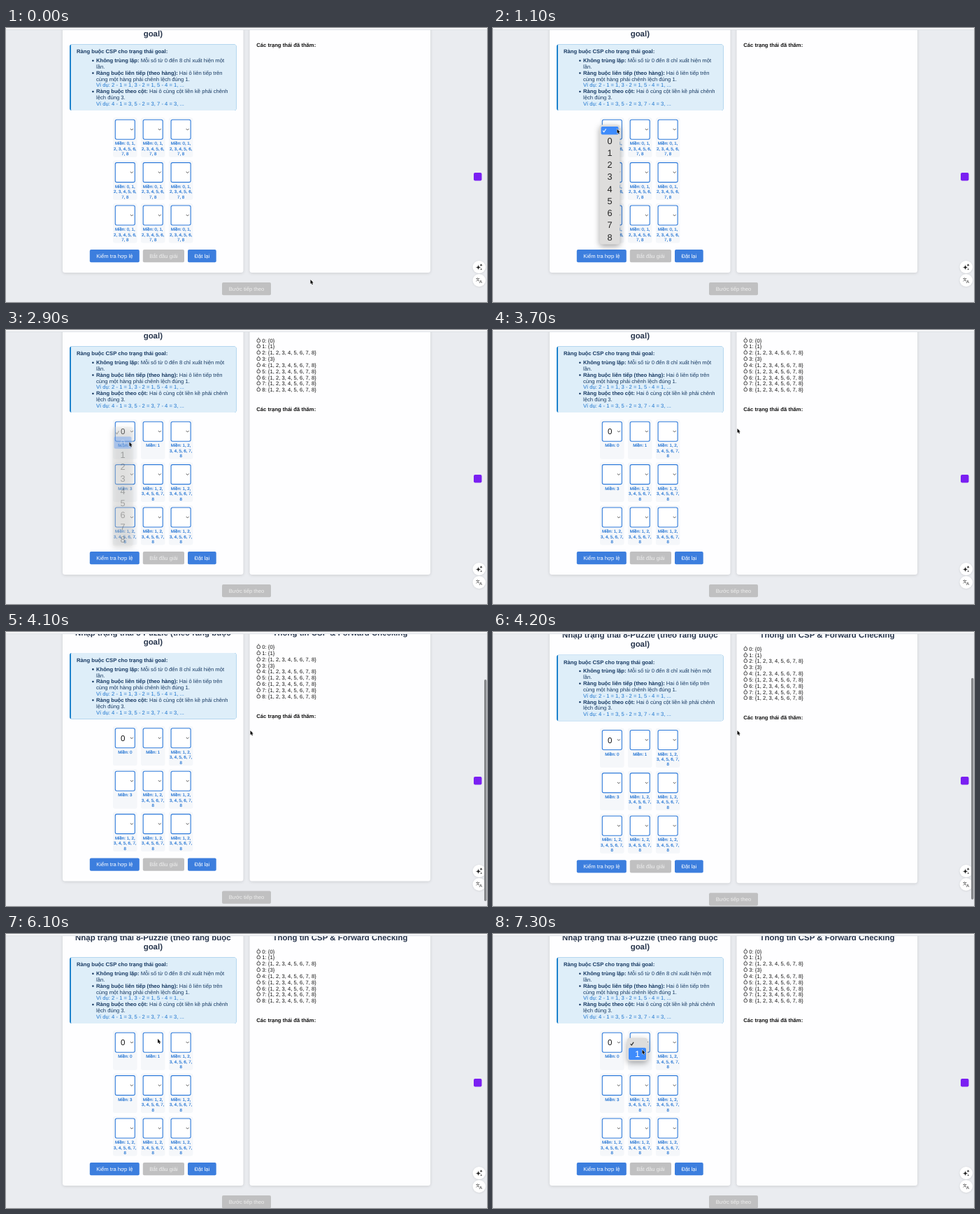
Recreate the animation shown at these times as an HTML page with a canvas. Size 688x392 px, loop 8000 ms.

```html
<!DOCTYPE html>
<html lang="vi">
<head>
<meta charset="utf-8">
<title>8-Puzzle CSP</title>
<style>
  html, body { margin: 0; width: 100%; height: 100%; overflow: hidden; background: #eaecf0; }
  canvas { display: block; width: 688px; height: 392px; }
</style>
</head>
<body>
<canvas id="stage"></canvas>
<script>
const W = 688, H = 392, LOOP = 8000, STEP = 100;
const FONT = '"Liberation Sans", Arial, sans-serif';
const BASE = 7.65, TITLE = 11.45, SMALL = 6.15;
const BLUE = '#2374d3', NAVY = '#183a63', GREY = '#c0c0c1';

const canvas = document.getElementById('stage');
const ctx = canvas.getContext('2d');
const dpr = window.devicePixelRatio || 1;
canvas.width = W * dpr;
canvas.height = H * dpr;

// Pointer tip: time, x, y
const PATH = [
  [0, 435.5, 360], [300, 290, 190], [500, 196, 79], [700, 177.5, 144.5],
  [1100, 177.5, 144.5], [1900, 180, 165], [2200, 168.5, 161],
  [2800, 168.5, 161], [3500, 224, 156], [3700, 349.5, 141],
  [5000, 349.5, 141], [5800, 224, 152], [6100, 217, 150],
  [6600, 217, 150], [7000, 221, 175], [7300, 213.5, 165.5], [LOOP, 213.5, 165.5]
];

const clamp = v => Math.max(0, Math.min(1, v));

function pointerAt(t) {
  const i = PATH.findIndex(p => p[0] > t);
  const [t0, x0, y0] = PATH[i - 1], [t1, x1, y1] = PATH[i];
  const k = (t - t0) / (t1 - t0);
  return [x0 + (x1 - x0) * k, y0 + (y1 - y0) * k];
}

function box(x, y, w, h, r, fill, stroke) {
  ctx.beginPath();
  ctx.roundRect(x, y, w, h, r);
  if (fill) { ctx.fillStyle = fill; ctx.fill(); }
  if (stroke) { ctx.strokeStyle = stroke; ctx.lineWidth = 1.1; ctx.stroke(); }
}

function shadowed(blur, dy, alpha, draw) {
  ctx.save();
  ctx.shadowColor = `rgba(0,0,0,${alpha})`;
  ctx.shadowBlur = blur * dpr;
  ctx.shadowOffsetY = dy * dpr;
  draw();
  ctx.restore();
}

// Draws text centred vertically on y and returns its width
function text(str, x, y, { size = BASE, color = '#111', bold = false, align = 'left' } = {}) {
  ctx.font = `${bold ? 'bold ' : ''}${size}px ${FONT}`;
  ctx.textAlign = align;
  ctx.fillStyle = color;
  ctx.fillText(str, x, y + size * 0.36);
  return ctx.measureText(str).width;
}

function line(points, color, width) {
  ctx.beginPath();
  points.forEach(([x, y]) => ctx.lineTo(x, y));
  ctx.strokeStyle = color;
  ctx.lineWidth = width;
  ctx.lineCap = ctx.lineJoin = 'round';
  ctx.stroke();
}

function panel(x) {
  shadowed(4, 1, 0.13, () => box(x, -30, 258.5, 380, 3.5, '#fefeff'));
}

function rules() {
  box(91, 23.5, 238.5, 94.5, 3, '#1d82cc');
  box(93, 23.5, 236.5, 94.5, [1, 3, 3, 1], '#deeef9');
  text('Ràng buộc CSP cho trạng thái goal:', 101, 33.5, { color: NAVY, bold: true });
  const rows = [
    ['Không trùng lặp:', ' Mỗi số từ 0 đến 8 chỉ xuất hiện một'],
    ['', 'lần.'],
    ['Ràng buộc liên tiếp (theo hàng):', ' Hai ô liên tiếp trên'],
    ['', 'cùng một hàng phải chênh lệch đúng 1.'],
    ['', 'Ví dụ: 2 - 1 = 1, 3 - 2 = 1, 5 - 4 = 1, ...'],
    ['Ràng buộc theo cột:', ' Hai ô cùng cột liền kề phải chênh'],
    ['', 'lệch đúng 3.'],
    ['', 'Ví dụ: 4 - 1 = 3, 5 - 2 = 3, 7 - 4 = 3, ...']
  ];
  rows.forEach(([head, body], i) => {
    const y = 46.4 + i * 8.83;
    let x = 129;
    if (head) {
      ctx.beginPath();
      ctx.arc(124.4, y + 0.4, 1.3, 0, 7);
      ctx.fillStyle = NAVY;
      ctx.fill();
      x += text(head, x, y, { color: NAVY, bold: true });
    }
    text(body, x, y, { color: body.startsWith('Ví') ? '#1c74cf' : NAVY });
  });
}

function domainLines(i, filled) {
  if (!filled) return ['Miền: 0, 1,', '2, 3, 4, 5, 6,', '7, 8'];
  if (i === 0 || i === 1 || i === 3) return ['Miền: ' + i];
  return ['Miền: 1, 2,', '3, 4, 5, 6, 7,', '8'];
}

function cell(i, filled) {
  const cx = 170.3 + (i % 3) * 39.9, y = 130.7 + Math.floor(i / 3) * 61.4;
  box(cx - 17.3, y - 2.5, 34.6, 56.5, 3, '#f5f7fa');
  box(cx - 14, y + 0.5, 28, 28, 2.2, '#fff', '#2f7bdb');
  line([[cx + 7.8, y + 13.7], [cx + 9.5, y + 15.4], [cx + 11.2, y + 13.7]], '#444', 0.9);
  if (filled && i === 0) text('0', cx - 3, y + 14.6, { size: 11.5, align: 'center' });
  domainLines(i, filled).forEach((str, n) => {
    const ty = y + 34.4 + n * 7.4;
    text(str, cx, ty, { size: SMALL, color: BLUE, align: 'center' });
    ctx.strokeStyle = BLUE;
    ctx.lineWidth = 0.18;
    ctx.strokeText(str, cx, ty + SMALL * 0.36);
  });
}

function button(label, x, y, w, enabled) {
  box(x, y, w, 18.3, 2, enabled ? '#3c7ede' : GREY);
  text(label, x + w / 2, y + 9.1, { color: enabled ? '#fff' : '#eeeeee', align: 'center' });
}

function page(filled) {
  panel(81);
  panel(348.5);
  const heading = { size: TITLE, color: '#26344b', bold: true, align: 'center' };
  text('Nhập trạng thái 8-Puzzle (theo ràng buộc', 210.3, -5.6, heading);
  text('goal)', 210.3, 7.5, heading);
  text('Thông tin CSP & Forward Checking', 478, -5.6, heading);
  rules();
  for (let i = 0; i < 9; i++) cell(i, filled);
  button('Kiểm tra hợp lệ', 119.8, 316.9, 71, true);
  button('Bắt đầu giải', 195.8, 316.9, 59.2, false);
  button('Đặt lại', 260, 316.9, 40.7, true);
  button('Bước tiếp theo', 309, 363.9, 70, false);

  if (filled) {
    for (let i = 0; i < 9; i++) {
      const set = i === 0 || i === 1 || i === 3 ? i : '1, 2, 3, 4, 5, 6, 7, 8';
      text(`Ô ${i}: {${set}}`, 358.3, 14.8 + i * 8.83);
    }
  }
  text('Các trạng thái đã thăm:', 358.3, filled ? 113.4 : 24.5, { bold: true });
}

// row: -1 is the blank entry, null is no highlight
function menu(x, y, items, row, alpha) {
  const rowH = 17.25, top = y + 14;
  ctx.save();
  ctx.globalAlpha = alpha;
  shadowed(8, 3, 0.35, () => box(x, y, 29, 15.7 + rowH * items.length, 4, '#dedddc'));
  if (row === -1) box(x + 2, y + 2.5, 25, 11.5, 2, '#3e8bfb');
  else if (row !== null) box(x + 2, top + row * rowH, 25, rowH, 2, '#3e8bfb');
  line([[x + 4.9, y + 8.7], [x + 6.2, y + 10.3], [x + 8.9, y + 6.3]], row === -1 ? '#fff' : '#222', 1.1);
  items.forEach((str, i) => text(str, x + 14.6, top + (i + 0.5) * rowH, {
    size: 12.7, color: i === row ? '#fff' : '#222', align: 'center'
  }));
  ctx.restore();
}

function star(x, y, r) {
  ctx.beginPath();
  ctx.moveTo(x, y - r);
  for (let i = 1; i <= 4; i++) {
    const a = (i - 1) * Math.PI / 2;
    ctx.quadraticCurveTo(x, y, x + r * Math.cos(a), y + r * Math.sin(a));
  }
  ctx.fillStyle = '#222';
  ctx.fill();
}

function sideTools() {
  box(669, 207, 11.5, 11.5, 2, '#7a1ff2');
  for (const y of [342, 361]) {
    shadowed(3, 0.5, 0.12, () => box(667.5, y - 9, 18.5, 18, 9, '#fff'));
  }
  star(675.6, 342.4, 4.2);
  star(679.6, 339.2, 2.1);
  star(679.8, 345, 1.6);
  ctx.font = '6px "Noto Sans CJK SC", "Noto Sans CJK", sans-serif';
  ctx.textAlign = 'center';
  ctx.fillStyle = '#333';
  ctx.fillText('文', 674.8, 362.4);
  text('A', 679, 362.6, { size: 6.2, color: '#333', align: 'center' });
}

function pointer(x, y) {
  ctx.save();
  ctx.translate(x, y);
  ctx.beginPath();
  for (const [px, py] of [[0, 0], [0, 6.1], [1.4, 4.9], [2.4, 7.2], [3.4, 6.8], [2.4, 4.5], [4.2, 4.4]]) ctx.lineTo(px, py);
  ctx.closePath();
  ctx.lineJoin = 'round';
  ctx.strokeStyle = '#fff';
  ctx.lineWidth = 1;
  ctx.stroke();
  ctx.fillStyle = '#000';
  ctx.fill();
  ctx.restore();
}

function draw(t) {
  ctx.setTransform(dpr, 0, 0, dpr, 0, 0);
  ctx.textRendering = 'geometricPrecision';
  ctx.fillStyle = '#eaecf0';
  ctx.fillRect(0, 0, W, H);

  const [px, py] = pointerAt(t);
  const scroll = t < 4100 ? 0 : 10 * (1 - Math.exp((4030 - t) / 65));
  ctx.save();
  ctx.translate(0, scroll);
  page(t >= 2900);
  ctx.restore();

  ctx.fillStyle = '#f8f9fa';
  ctx.fillRect(0, 0, W, 2);
  ctx.fillStyle = '#dde0e5';
  ctx.fillRect(0, 2, W, 1);
  sideTools();

  if (t >= 4100 && t < 5300) {
    ctx.globalAlpha = 1 - clamp((t - 4900) / 400);
    box(684, 73.5 - scroll * 0.83, 3.4, 317, 1.7, '#85878a');
    ctx.globalAlpha = 1;
  }
  if (t >= 1100 && t < 3000) {
    const row = t === 2700 ? null : py < 152.5 ? -1 : 0;
    menu(152.5, 138.5, [...'012345678'], row, 1 - clamp((t - 2700) / 300));
  }
  if (t >= 6500) menu(192, 148.8, ['1'], py < 162.8 ? -1 : 0, 1);
  pointer(px, py);
}

function tick(now) {
  draw(Math.floor((now % LOOP) / STEP) * STEP);
  requestAnimationFrame(tick);
}
draw(0);
requestAnimationFrame(tick);
</script>
</body>
</html>
```
